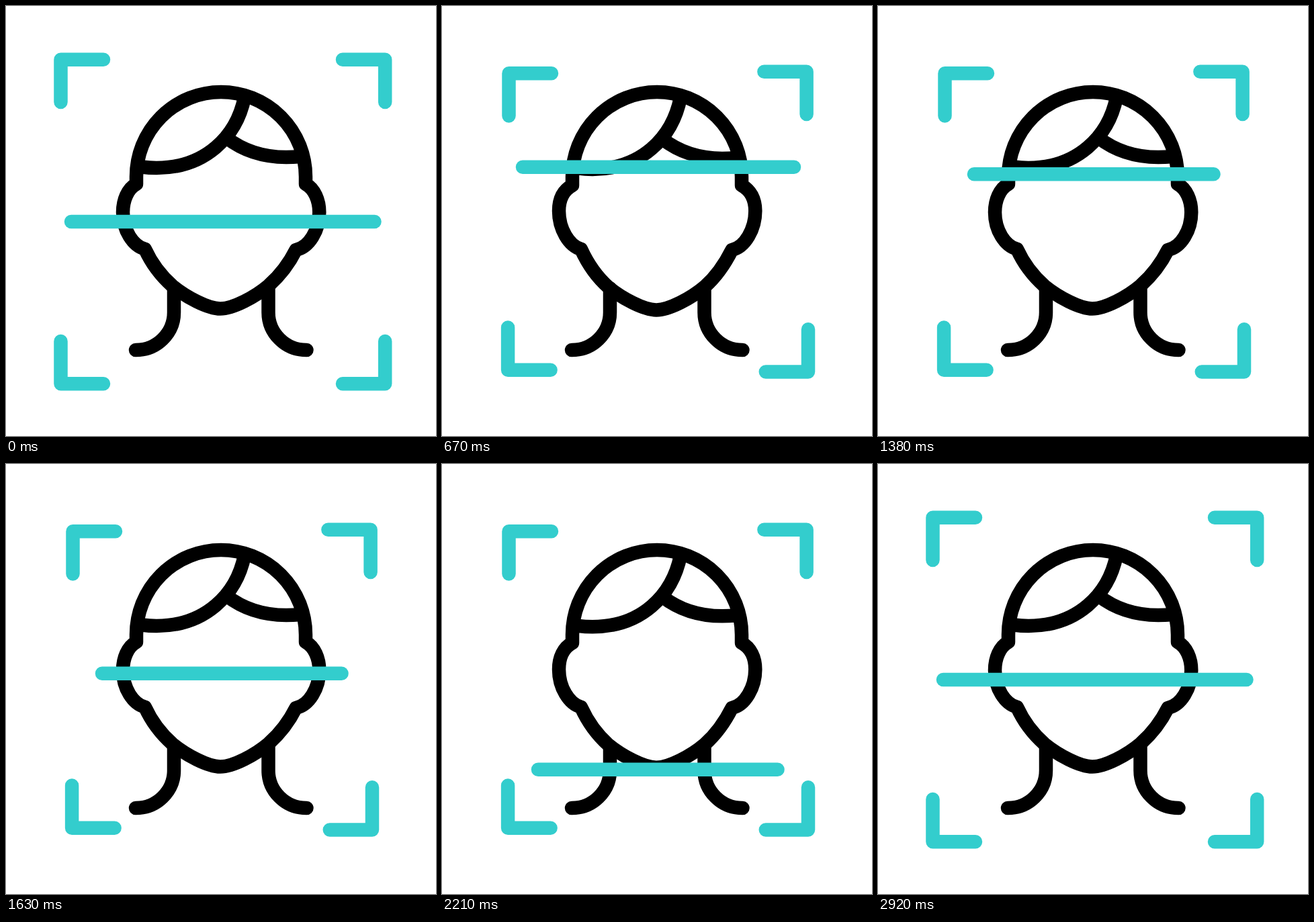
An HTML page for the animation above (3 s loop, 640 px wide and 640 px high).

```html
<!DOCTYPE html>
<html lang="en">
<head>
<meta charset="utf-8">
<title>Face scan</title>
<style>
html, body { margin: 0; width: 100%; height: 100%; overflow: hidden; background: #fff; }
svg { display: block; width: 100vw; height: 100vh; }
path { fill: none; stroke: #000; stroke-width: 20.5; stroke-linecap: round; stroke-linejoin: round; }
#hair path { stroke-linecap: butt; }
#frame path, #bar { stroke: #33cdcd; }
</style>
</head>
<body>
<svg viewBox="0 0 640 640">
  <path d="M250 420V456A56.5 56 0 0 1 193 512M390.5 420V456A56.5 56 0 0 0 447.500 512"/>
  <g id="hair"><path id="fringe"/><path id="side"/></g>
  <path id="head"/>
  <g id="frame">
    <path d="M81.500 143V79.700H145"/>
    <path d="M501 79.700H564.200V143"/>
    <path d="M81.500 499V562.300H145"/>
    <path d="M501 562.300H564.200V499"/>
  </g>
  <path id="bar"/>
</svg>
<script>
const LOOP = 3000, FPS = 24;
const MID = 321, TOP = 158.3, LOW = 485.500;
const INSET = [[18, 20.5], [-21.6, 18], [16.6, -20.6], [-19.2, -17.700]];

const $ = id => document.getElementById(id);
const corners = [...document.querySelectorAll('#frame path')];
const clamp = v => Math.min(1, Math.max(0, v));
const mix = (a, b, p) => a + (b - a) * p;
const span = (n, a, b) => clamp((n - a) / (b - a));
const smooth = p => p * p * (3 - 2 * p);

// cubic-bezier(.75, 0, .25, 1), solved by bisection
function strong(p) {
  let lo = 0, hi = 1;
  for (let i = 0; i < 24; i++) {
    const s = (lo + hi) / 2, r = 1 - s;
    if (2.25 * s * r * r + 0.75 * s * s * r + s * s * s < p) lo = s; else hi = s;
  }
  return smooth((lo + hi) / 2);
}

const bump = (n, a, b) => smooth(1 - clamp(Math.abs(n - (a + b) / 2) / ((b - a) / 2)));

function drawFace(b) {
  const d = 2.6 * b;
  $('fringe').setAttribute('d',
    `M355 136C343 ${195 + d} 296 ${241 + d} 224 ${241 + d}Q213 ${241 + d} 202 ${239.5 + d}`);
  $('side').setAttribute('d',
    `M328 ${196 + d}C355 ${217 + d} 385 ${225 + d} 417 ${225 + d}Q427 ${225 + d} 439 ${224 + d}`);
  $('head').setAttribute('d',
    `M194 ${265 + d}V254A126 126 0 0 1 446 254V${265 + d}` +
    `C459 ${272 + d} 466.300 ${289 - d} 466.300 ${307 - d}C466.300 ${334 - d} 451 359 431.500 363` +
    `C421 384 409 ${400 + d} 391 ${416 + d}C371 ${433 + d} 338 ${450.5 + d} 319 ${450.5 + d}` +
    `C300 ${450.5 + d} 268 ${433 + d} 248 ${417 + d}C230 ${401 + d} 217 384 207 362` +
    `C189 357 174 ${334 - d} 174 ${307 - d}C174 ${289 - d} 181 ${272 + d} 194 ${265 + d}Z`);
}

function draw(n) {
  const back = strong(span(n, 60, 70));
  const shrink = strong(span(n, 0, 10)) * (1 - back);
  corners.forEach((c, i) =>
    c.setAttribute('transform', `translate(${INSET[i][0] * shrink} ${INSET[i][1] * shrink})`));

  const rise = smooth(span(n, 14, 18));
  const narrow = rise * (1 - back);
  const scan = mix(TOP, LOW, span(n, 24, 56));
  const y = mix(mix(MID, scan, rise), MID, back);
  $('bar').setAttribute('d', `M${mix(97, 143, narrow)} ${y}H${mix(548.5, 499.5, narrow)}`);

  drawFace(bump(n, 8, 20) + bump(n, 50, 62));
}

const start = performance.now();
function tick(now) {
  const t = Math.max(0, now - start) % LOOP;
  draw(Math.floor((t + 5) * FPS / 1000) % 72);
  requestAnimationFrame(tick);
}
draw(0);
requestAnimationFrame(tick);
</script>
</body>
</html>
```
